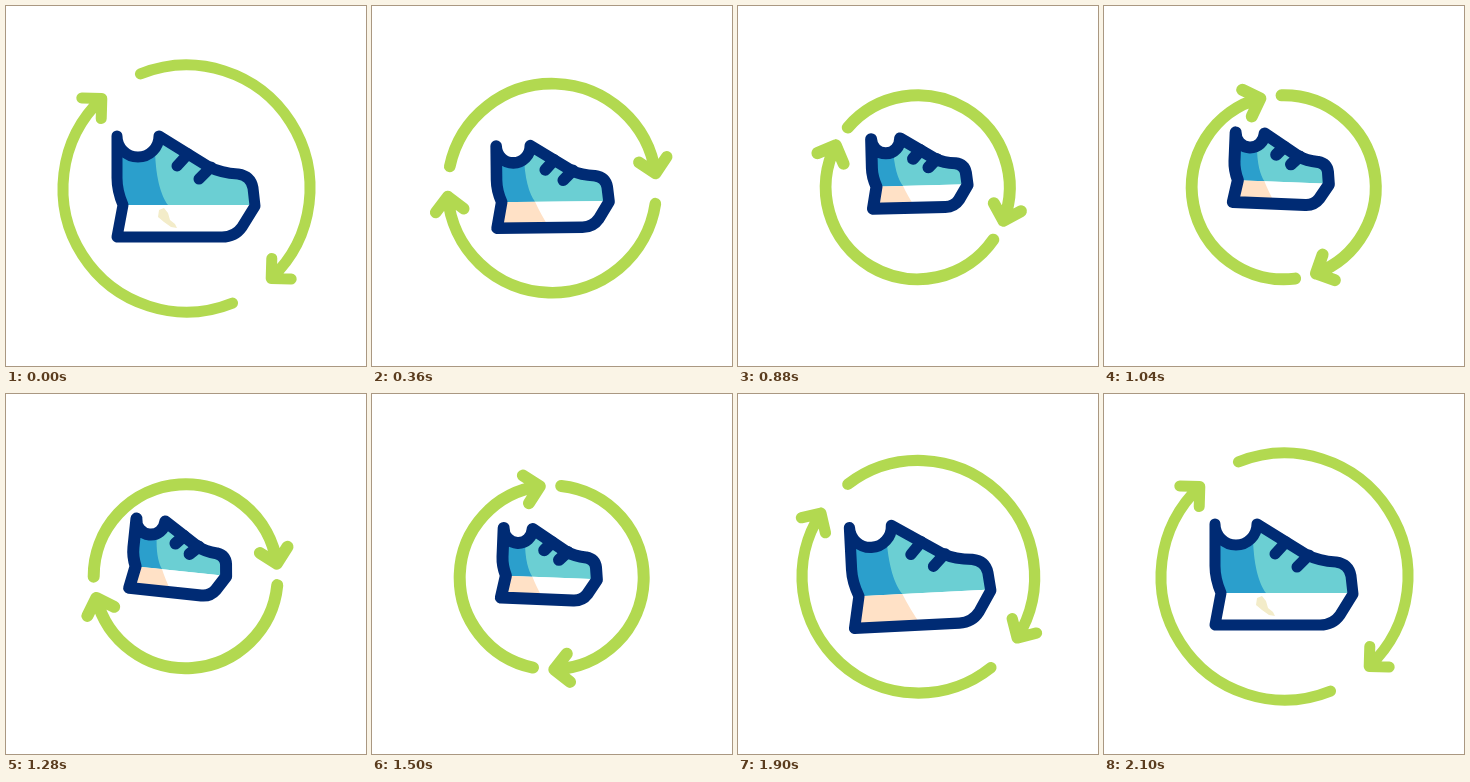
Write an HTML page that moves like this. It is 360 by 360 pixels and loops after 2980 ms.

```html
<!DOCTYPE html>
<html lang="en">
<head>
<meta charset="utf-8">
<title>Shoe in a turning ring</title>
<style>
  html, body { margin: 0; width: 100%; height: 100%; overflow: hidden; background: #fff; }
  svg { display: block; width: 100vw; height: 100vh; }
  .line { fill: none; stroke-linecap: round; stroke-linejoin: round; vector-effect: non-scaling-stroke; }
  .green { stroke: #b2d950; }
  .navy { stroke: #002b74; }
</style>
</head>
<body>
<svg id="stage" viewBox="0 0 360 360">
  <defs>
    <path id="outline" class="line navy" d="M111 130V172Q111 185 117 199L111 231H216Q229 231 236 221L249 200L247 182Q245 170 232 168Q215 167 203 161L153 130A21 21 0 0 1 111 130Z"/>
    <clipPath id="inside"><use href="#outline"/></clipPath>
  </defs>
  <path id="arcA" class="line green"/>
  <path id="arcB" class="line green"/>
  <g id="shoe">
    <g clip-path="url(#inside)">
      <path fill="#6bcfd3" d="M100 120H260V199H100Z"/>
      <path fill="#fff" d="M100 199H260V240H100Z"/>
      <g id="shade">
        <path fill="#2b9fcc" d="M100 120H149V140C149 170 155 190 162 199H100Z"/>
        <path id="peach" fill="#ffe1c6" d="M100 199H162Q168 213 179 231V240H100Z"/>
      </g>
      <path id="sliver" fill="#f3ecc9" d="M153 204L158 202L162 207L164 214L169 218L171 222L165 221L158 216L152 211Z"/>
    </g>
    <use href="#outline"/>
    <path class="line navy" d="M182 148L171 160M205 161L193 173"/>
  </g>
</svg>
<script>
const LOOP = 2980, STEP = 20, START = 220, END = 2100;
const $ = id => document.getElementById(id);

// Eased value at time t through [time, value] keys
function track(t, ...keys) {
  if (t <= keys[0][0]) return keys[0][1];
  for (let i = 1; i < keys.length; i++) {
    const [t0, a] = keys[i - 1], [t1, b] = keys[i];
    if (t < t1) {
      const u = (t - t0) / (t1 - t0);
      return a + (b - a) * u * u * (3 - 2 * u);
    }
  }
  return keys[keys.length - 1][1];
}

function polar(x, y, r, deg) {
  const a = deg * Math.PI / 180;
  return [x + r * Math.cos(a), y + r * Math.sin(a)];
}

function arrowArc(cx, cy, r, from, to, lean) {
  const start = polar(cx, cy, r, from), tip = polar(cx, cy, r, to);
  const back = to - 90 - lean;
  const leg = side => polar(...tip, 20, back + side * 45);
  return `M${start}A${r} ${r} 0 0 1 ${tip}M${leg(-1)}L${tip}L${leg(1)}`;
}

function drawRing(t, shrink) {
  const turn = track(t, [200, 0], [370, -56], [650, -56], [2062, 360]);
  const bob = track(t, [215, 0], [635, -1.2], [1100, -1.2], [1500, 1], [2080, 0]);
  const r = 123.5 - 31.5 * shrink;
  const cx = 180.5 - 0.8 * shrink, cy = 182.5 + bob;
  const half = 10.7 - 4 * shrink;
  const gap1 = 237.4 + turn + 2.9 * shrink;
  const gap2 = 57.4 + turn - 2.9 * shrink;
  const lean = 5 * shrink;
  $('arcA').setAttribute('d', arrowArc(cx, cy, r, gap1 + half, gap2 + 360 - half, lean));
  $('arcB').setAttribute('d', arrowArc(cx, cy, r, gap2 + half, gap1 - half, lean));
}

function drawShoe(t, shrink) {
  const scale = track(t, [215, 1], [470, 0.69], [1500, 0.69], [1840, 1]);
  const tilt = track(t, [250, 0], [680, -4], [1290, 6], [1800, -4], [2090, 0]);
  const lift = track(t, [340, 0], [1130, -18], [1920, 0]);
  $('shoe').setAttribute('transform',
    `translate(${180.5 - tilt} ${180.5 + lift}) rotate(${tilt}) scale(${scale}) translate(-180.5 -180.5)`);
  $('shade').setAttribute('transform', `translate(${-6.5 * shrink} 0)`);
  const resting = t < START || t >= END;
  $('peach').style.display = resting ? 'none' : '';
  $('sliver').style.display = resting ? '' : 'none';
}

function frame() {
  const now = performance.now() % LOOP;
  const t = Math.floor(now / STEP) * STEP;
  const shrink = track(t, [215, 0], [470, 1], [1500, 1], [2080, 0]);
  $('stage').setAttribute('stroke-width', 11 + shrink);
  drawRing(t, shrink);
  drawShoe(t, shrink);
  requestAnimationFrame(frame);
}
frame();
</script>
</body>
</html>
```
